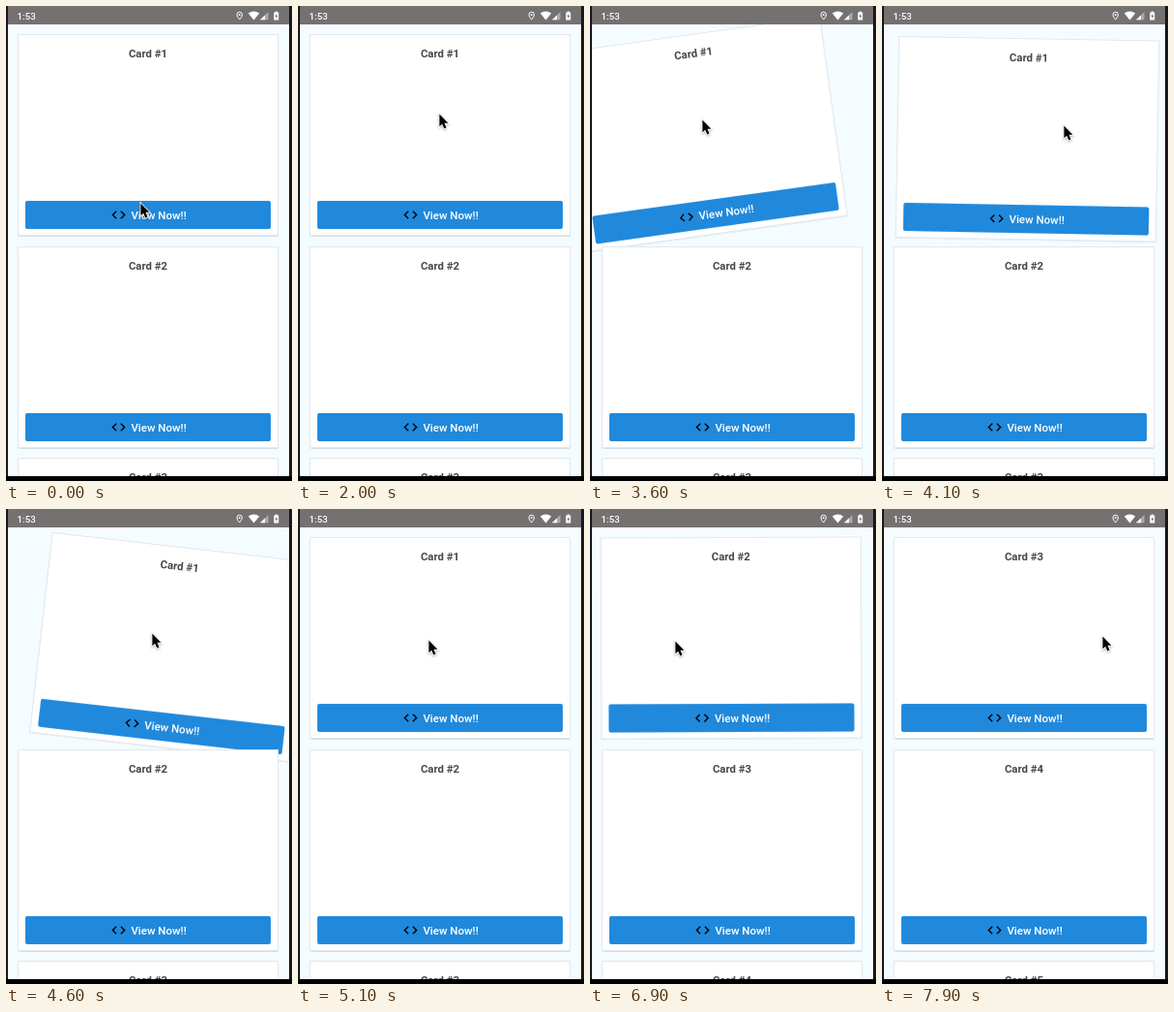
Write an HTML page that moves like this. It is 296 px wide and 490 px high and loops after 8 s.

```html
<!DOCTYPE html>
<html lang="en">
<head>
<meta charset="utf-8">
<title>Card deck</title>
<style>
html, body { margin: 0; width: 100%; height: 100%; overflow: hidden; background: #17181c; }
#stage { position: relative; width: 296px; height: 490px; overflow: hidden; font-family: Roboto, sans-serif; }
#screen { position: absolute; left: 2px; top: 0; width: 291px; height: 485px; overflow: hidden; background: #f5fcff; }
#floor { position: absolute; left: 0; top: 485px; width: 296px; height: 5px; background: #000; }
.card {
  position: absolute; left: 10px; width: 270px; height: 208px; box-sizing: border-box;
  background: #fff; border: 1px solid #e1e8ee; box-shadow: 0 .5px 1px rgba(0, 0, 0, .12);
  transform-origin: 135.5px 99px;
}
.title {
  position: absolute; left: 0; right: 0; top: 11px; text-align: center;
  font-weight: 700; font-size: 11.4px; line-height: 16px; color: #43484d;
}
.button {
  position: absolute; left: 7px; top: 171px; width: 254px; height: 29px; border-radius: 2px;
  background: #2089dc; color: #fff; box-shadow: 0 0 1px rgba(32, 137, 220, .4), inset 0 0 1px rgba(255, 255, 255, .3);
}
.button svg { position: absolute; left: 88.4px; top: 6px; }
.button span { position: absolute; left: 109.4px; top: 7px; font-weight: 500; font-size: 11.5px; line-height: 16px; white-space: nowrap; }
#status { position: absolute; left: 0; top: 0; }
#cursor { position: absolute; left: 0; top: 0; overflow: visible; filter: drop-shadow(0 1px 1px rgba(0, 0, 0, .3)); }
</style>
</head>
<body>
<div id="stage">
  <div id="screen"></div>
  <svg id="status" width="296" height="19" fill="#fff">
    <path fill="#757171" d="M2 0h291v19H2z"/>
    <text x="11.6" y="13.6" font-size="9.7" font-weight="500">1:53</text>
    <path fill="none" stroke="#fff" d="M241.7 14C240 11.8 239 10.4 239 8.9a2.7 2.7 0 0 1 5.4 0C244.4 10.4 243.4 11.8 241.7 14z"/>
    <circle cx="241.7" cy="8.9" r="1"/>
    <path d="M256.5 14.5L250.8 7.6Q256.5 3.6 262.2 7.6z"/>
    <path fill-opacity=".4" d="M263 14.3L271.5 6v8.3z"/>
    <path d="M263 14.3L268 9.4v4.9z"/>
    <path d="M277.3 6.6h1.5V5.6h1.9v1h1.5v7.9h-4.9z"/>
    <path fill="#757171" d="M280.2 7.8l-1.7 3.2h1.1v2.3l1.6-3.2h-1z"/>
  </svg>
  <div id="floor"></div>
  <svg id="cursor" width="14" height="20">
    <path transform="translate(.4 .6) scale(.86)" d="M0 0V14.8L3.3 11.7L5.7 17.3L8.3 16.2L5.9 10.7H10.5Z" stroke="#fff" stroke-width="2" paint-order="stroke"/>
  </svg>
</div>
<script>
const LOOP = 8000, STEP = 100, WIDTH = 293;
const LAG = 215;   // the card trails the pointer by this much
const FLIGHT = 250;

// Where the pointer passes or rests: [ms, x, y]
const route = [
  [100, 139, 203], [1000, 140, 152], [1300, 140, 124], [1900, 140, 124], [2000, 146, 111],
  [2200, 153, 101], [2500, 153, 101], [2545, 153, 116], [3100, 153, 112], [4525, 153, 127],
  [5100, 135, 135], [5500, 232, 138], [5800, 232, 138], [6100, 153, 138], [6200, 153, 138],
  [6467, 88, 136], [6900, 88, 136], [7000, 135, 135], [7350, 228, 131]
];
const wiggle = { from: 2545, period: 1320, turns: 1.5, reach: 38.4 };
const gestures = [
  { press: 2545, release: 4400 },
  { press: 5100, release: 5385, toss: true },
  { press: 6200, release: 6467 },
  { press: 7000, release: 7335, toss: true }
];

function along(path, t) {
  const i = path.findIndex(p => p[0] > t);
  if (i === 0) return path[0].slice(1);
  if (i < 0) return path[path.length - 1].slice(1);
  const [a, b] = [path[i - 1], path[i]];
  const k = (t - a[0]) / (b[0] - a[0]);
  return [1, 2].map(n => a[n] + (b[n] - a[n]) * k);
}

function pointerAt(t) {
  const [x, y] = along(route, t);
  const turn = (t - wiggle.from) / wiggle.period;
  const sway = turn > 0 && turn < wiggle.turns ? wiggle.reach * Math.sin(2 * Math.PI * turn) : 0;
  return [x + sway, y];
}

// Remaining share of the offset, s seconds after letting go.
const spring = s => Math.exp(-11 * s) * (Math.cos(10.45 * s) + 1.05 * Math.sin(10.45 * s));

function topOffset(t) {
  const touch = t - LAG;
  const g = gestures.filter(g => g.press <= touch).pop();
  if (!g) return [0, 0];
  const grab = pointerAt(g.press);
  const [x, y] = pointerAt(Math.min(touch, g.release)).map((v, n) => v - grab[n]);
  const since = Math.max(0, touch - g.release);
  if (!g.toss) return [x * spring(since / 1000), y * spring(since / 1000)];
  if (since >= FLIGHT) return [0, 0];
  const k = since / FLIGHT, eased = k * k * (3 - 2 * k);
  return [x + (WIDTH - x) * eased, y * (1 - eased)];
}

const tossedBy = t => gestures.filter(g => g.toss && t - LAG >= g.release + FLIGHT).length;

const cards = [0, 1, 2].map(i => {
  const card = document.createElement('div');
  card.className = 'card';
  card.style.top = Math.round(29 + 218.6 * i) + 'px';
  card.innerHTML = `<div class="title"></div>
    <div class="button">
      <svg width="17.1" height="17.1" viewBox="0 0 24 24"><path d="M9.4 16.6L4.8 12l4.6-4.6L8 6l-6 6 6 6zM14.6 16.6l4.6-4.6-4.6-4.6L16 6l6 6-6 6z"/></svg>
      <span>View Now!!</span>
    </div>`;
  document.getElementById('screen').append(card);
  return card;
});
const titles = cards.map(card => card.querySelector('.title'));
const cursor = document.getElementById('cursor');

function draw(now) {
  const t = Math.floor((now % LOOP) / STEP) * STEP;
  const first = 1 + tossedBy(t);
  titles.forEach((title, i) => {
    const label = 'Card #' + (first + i);
    if (title.textContent !== label) title.textContent = label;
  });
  const [dx, dy] = topOffset(t);
  const angle = dx / (WIDTH * 1.5) * 120;
  cards[0].style.transform = Math.abs(dx) < .3 ? 'none' : `translate(${dx}px, ${dy}px) rotate(${angle}deg)`;
  const [x, y] = pointerAt(t).map(Math.round);
  cursor.style.transform = `translate(${x}px, ${y}px)`;
}

const start = performance.now();
function tick() {
  draw(performance.now() - start);
  requestAnimationFrame(tick);
}
tick();
</script>
</body>
</html>
```
